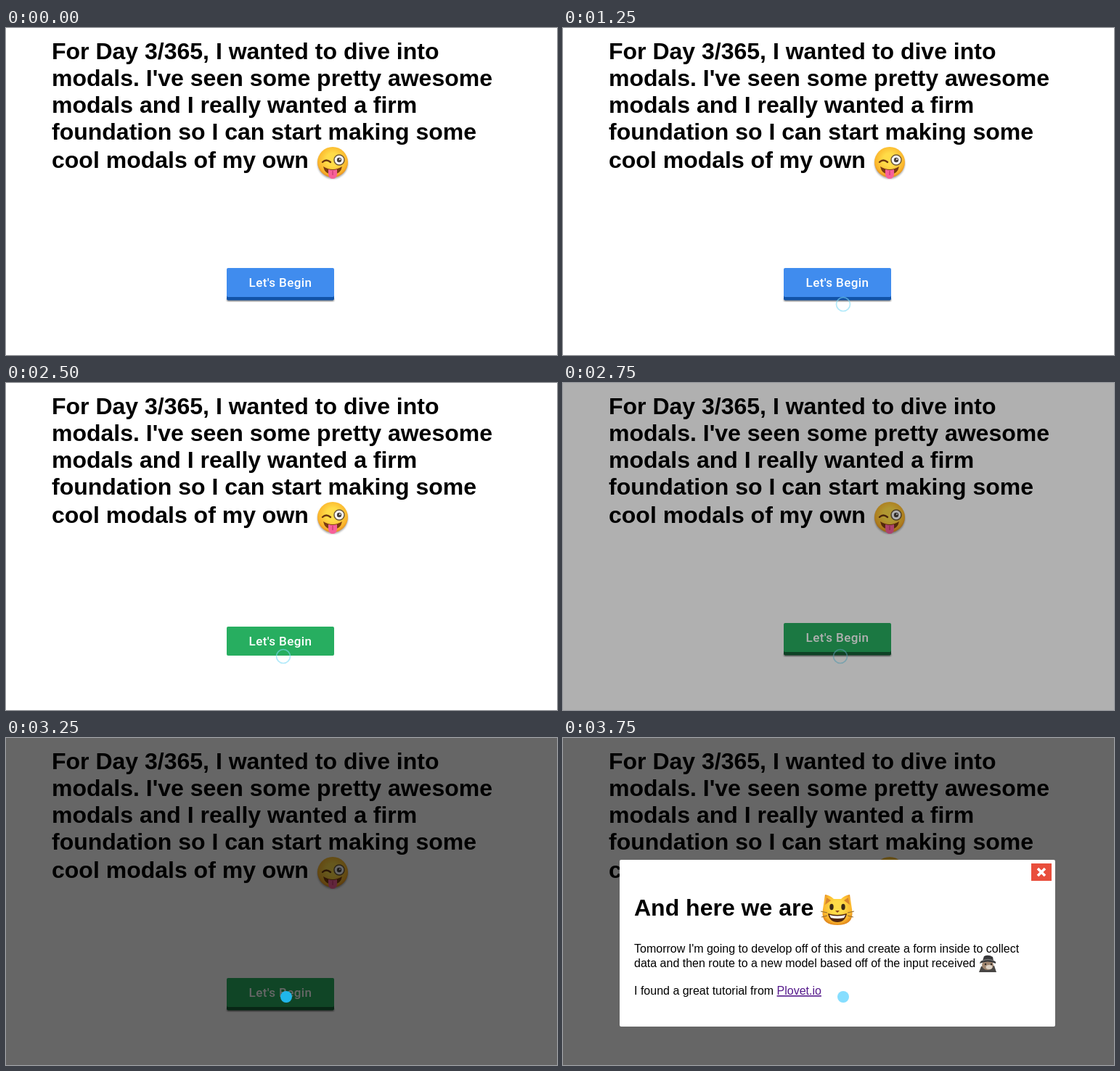
An HTML page for the animation above (8000 ms loop, 759 px wide and 451 px high).

```html
<!DOCTYPE html>
<html lang="en">
<head>
<meta charset="utf-8">
<title>Modal demo</title>
<style>
  html, body { margin: 0; width: 100%; height: 100%; overflow: hidden; background: #fff; }
  svg { display: block; }
  text { font: 16px "Liberation Sans", Arial, sans-serif; white-space: pre; }
  .big { font-size: 32px; font-weight: bold; }
  .label { font: 500 17px Roboto, sans-serif; letter-spacing: .4px; fill: #fff; text-anchor: middle; }
  .link { fill: #551a8b; text-decoration: underline; }
</style>
</head>
<body>
<svg width="759" height="451" viewBox="0 0 759 451">
  <defs>
    <radialGradient id="face" cy=".42" r=".6">
      <stop offset=".35" stop-color="#ffdc48"/>
      <stop offset=".8" stop-color="#fbb52c"/>
      <stop offset="1" stop-color="#df851c"/>
    </radialGradient>
    <filter id="soft" x="-20%" y="-20%" width="140%" height="140%"><feGaussianBlur stdDeviation="1"/></filter>
  </defs>

  <text class="big" x="63" y="43">For Day 3/365, I wanted to dive into</text>
  <text class="big" x="63" y="80">modals. I've seen some pretty awesome</text>
  <text class="big" x="63" y="117">modals and I really wanted a firm</text>
  <text class="big" x="63" y="154">foundation so I can start making some</text>
  <text class="big" x="63" y="193">cool modals of my own</text>

  <!-- winking face -->
  <g transform="translate(450 185)">
    <circle cy="2" r="21" fill="#777" opacity=".6" filter="url(#soft)"/>
    <circle r="21" fill="url(#face)"/>
    <path d="M-13 6Q0 14 13 6Q11 17 0 17Q-11 17-13 6" fill="#7a3b12"/>
    <path d="M-6 10Q0 12 6 10V17Q5 23 0 23Q-5 23-6 17Z" fill="#f7609a"/>
    <path d="M0 12V18" stroke="#c93a70" stroke-width="1.3"/>
    <path d="M-14 0Q-9-5-3 0" fill="none" stroke="#6b3710" stroke-width="2.4" stroke-linecap="round"/>
    <circle cx="9" cy="-3" r="7" fill="#fff" stroke="#6f5a3a" stroke-width="1.5"/>
    <circle cx="9" cy="-3" r="3.2" fill="#47413c"/>
    <circle cx="10" cy="-4" r="1" fill="#fff"/>
  </g>

  <g id="button">
    <rect id="shade" x="304" y="373" width="148" height="4" rx="2" fill="#000" opacity=".5" filter="url(#soft)"/>
    <rect id="edge" x="304" y="335" width="148" height="40.5" rx="2"/>
    <rect id="top" x="304" y="331" width="148" height="40" rx="2"/>
    <text class="label" x="378" y="357">Let's Begin</text>
  </g>

  <circle id="ring" r="9.5" fill="none" stroke="#7edcf6" stroke-width="1.7" opacity=".6"/>
  <rect id="overlay" width="759" height="451"/>

  <g id="modal">
    <rect x="78" width="600" height="230" rx="2" fill="#fff"/>
    <rect x="645" y="5" width="28" height="24" fill="#e94e3c"/>
    <path d="M654 12l10 10m0-10l-10 10" stroke="#fff" stroke-width="3.6"/>
    <text class="big" x="98" y="77">And here we are</text>

    <!-- cat face -->
    <g transform="translate(378 69)">
      <path d="M-20-1L-17-21Q-10-20-5-15H5Q10-20 17-21L20-1Q24 21 0 21Q-24 21-20-1" fill="url(#face)"/>
      <path d="M-17-7L-15-17L-9-13ZM17-7L15-17L9-13Z" fill="#d9852c"/>
      <ellipse cx="-8" cy="-4" rx="2.7" ry="4.2" fill="#3c2a16"/>
      <ellipse cx="8" cy="-4" rx="2.7" ry="4.2" fill="#3c2a16"/>
      <path d="M-3 1H3L0 4Z" fill="#8c4a18"/>
      <path d="M-13 5Q0 9 13 5Q11 17 0 17Q-11 17-13 5" fill="#53280f"/>
      <path d="M-11 7Q0 10 11 7L9 11Q0 13-9 11Z" fill="#fff"/>
      <path d="M-23 2L-14 4M-22 10L-14 8M23 2L14 4M22 10L14 8" stroke="#8e6a30"/>
    </g>

    <text x="98" y="128">Tomorrow I'm going to develop off of this and create a form inside to collect</text>
    <text x="98" y="148">data and then route to a new model based off of the input received</text>
    <text x="98" y="186">I found a great tutorial from <tspan class="link">Plovet.io</tspan></text>

    <!-- cat in a hat and coat -->
    <g transform="translate(585 144)">
      <path d="M-12 11L-9 3L9 2L12 11Z" fill="#484644"/>
      <ellipse cy="1" rx="8" ry="7" fill="#a18670"/>
      <ellipse cx="2" cy="4" rx="4.5" ry="3" fill="#ddd2c5"/>
      <circle cx="-3" cy="0" r="1.2" fill="#2d2926"/>
      <circle cx="5" cy="0" r="1.2" fill="#2d2926"/>
      <path d="M-11-1Q-10-5-7-5L-5-11Q1-14 7-10L8-5Q12-4 11-1Q0-6-11-1" fill="#38383a"/>
      <path d="M-7-5Q0-8 8-5" fill="none" stroke="#777" stroke-width="1.4"/>
    </g>
  </g>

  <circle id="dot" cx="386" cy="357" r="8"/>
</svg>
<script>
const LOOP = 8000;
const el = id => document.getElementById(id);
const set = (id, attrs) => {
  for (const name in attrs) el(id).setAttribute(name, attrs[name]);
};
const show = (id, visible) => set(id, { visibility: visible ? "visible" : "hidden" });

// Pointer stops: time, x, y
const pointer = [
  [500, 385, 451], [750, 390, 378], [1000, 391, 367], [1250, 386, 381],
  [1500, 385.5, 381.5], [1750, 386, 381], [2000, 388, 358], [2250, 386, 359],
  [2500, 382, 377]
];
const fade = [[0, 0], [2750, .31], [3000, .585], [3250, .6]];
const latest = (steps, t) => steps.filter(step => step[0] <= t).pop();

function draw(t) {
  const hover = t >= 2000;
  const pressed = t >= 2500 && t < 2750;
  set("top", { fill: hover ? "#27ae60" : "#408cee" });
  set("edge", { fill: hover ? "#145f35" : "#1153a8" });
  set("button", { transform: `translate(0 ${pressed ? 5 : 0})` });
  show("edge", !pressed);
  show("shade", !pressed);

  const stop = latest(pointer, t);
  show("ring", stop && t < 3250);
  if (stop) set("ring", { cx: stop[1], cy: stop[2] });

  set("overlay", { opacity: latest(fade, t)[1] });
  show("modal", t >= 3500);
  set("modal", { transform: `translate(0 ${t < 3750 ? 119 : 168})` });
  show("dot", t >= 3250);
  set("dot", { fill: t < 3750 ? "#20b6ea" : "#86deff" });
}

const start = performance.now();
function tick() {
  draw((performance.now() - start) % LOOP);
  requestAnimationFrame(tick);
}
tick();
</script>
</body>
</html>
```
